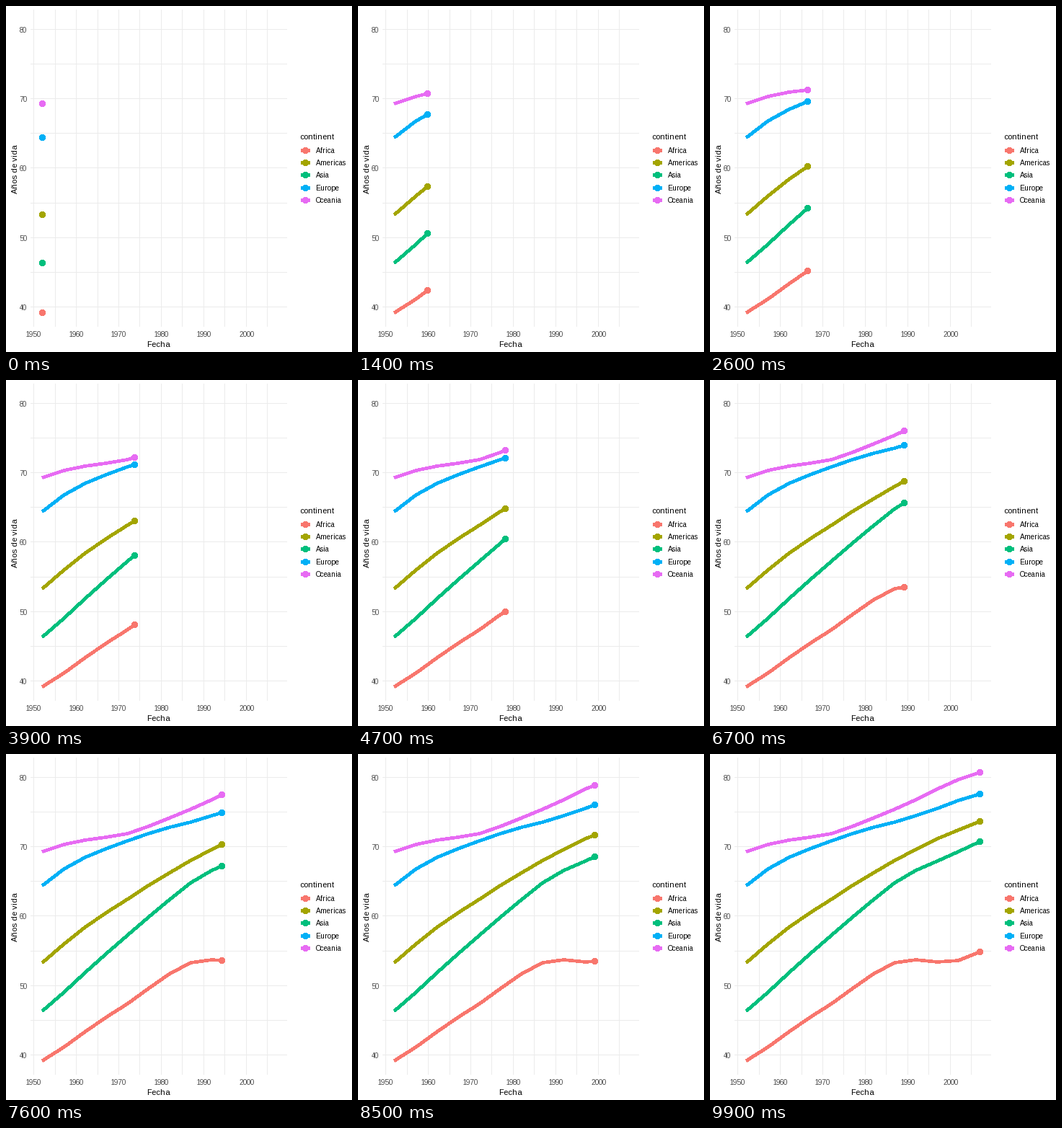
These frames come from a looping animation (480x480 px, 10 s). A matplotlib script:

```python
import numpy as np
import matplotlib.pyplot as plt
from matplotlib.animation import FuncAnimation
from matplotlib.patches import Circle, Rectangle

plt.rcParams["font.family"] = "Liberation Sans"
plt.rcParams["text.hinting_factor"] = 1

SIZE, FRAMES = 480, 100
LEFT, TOP, WIDTH, HEIGHT = 34.4, 5.5, 356, 440.2
GRID, TICK = "#EBEBEB", "#4D4D4D"
FIRST, LAST = 1952, 2007
YEARS = np.arange(FIRST, LAST + 1, 5)

# name: colour, first value, last value, sine waves bending the straight line
SERIES = {
    "Africa": ("#F8766D", 39.14, 54.81, (3.45, -0.44, -0.43, 0.49, -0.24)),
    "Americas": ("#A3A500", 53.28, 73.61, (2.03, 0.04, 0.19, 0.08, 0.05)),
    "Asia": ("#00BF7D", 46.31, 70.73, (2.68, -0.45, -0.05, 0.16, -0.08)),
    "Europe": ("#00B0F6", 64.41, 77.65, (1.43, 0.68, 0.19, 0.10, 0.13)),
    "Oceania": ("#E76BF3", 69.25, 80.72, (-1.27, -0.11, 0.32, 0.13, 0.14)),
}
X_MIN, X_SPAN = FIRST - 2.75, 60.5
Y_MAX, Y_SPAN = 82.799, 45.742


def life(start, end, waves):
    u = (YEARS - FIRST) / (LAST - FIRST)
    bend = sum(a * np.sin(k * np.pi * u) for k, a in enumerate(waves, 1))
    return start + (end - start) * u + bend


def px(year):
    return np.floor(LEFT + (np.asarray(year) - X_MIN) / X_SPAN * WIDTH)


def py(value):
    return np.floor(TOP + (Y_MAX - np.asarray(value)) / Y_SPAN * HEIGHT)


fig = plt.figure(figsize=(SIZE / 72, SIZE / 72), dpi=72, facecolor="white")
ax = fig.add_axes([0, 0, 1, 1])
ax.set_xlim(0, SIZE)
ax.set_ylim(SIZE, 0)
ax.axis("off")


def box(x, y, w, h):
    ax.add_patch(Rectangle((x, y), w, h, fc=GRID, ec="none", aa=False, zorder=1))


def label(x, y, text, size=9.5, color="black", ha="left", **kw):
    ax.text(x, y, text, fontsize=size, color=color, ha=ha, va="baseline", **kw)


def stroke(xs, ys, color):
    # Aliased drawing fills every touched pixel, so 3.6 comes out 5 wide
    line, = ax.plot(xs, ys, color=color, lw=3.6, aa=False, zorder=2,
                    solid_capstyle="butt", solid_joinstyle="round")
    line.set_snap(False)
    return line


def dot(x, y, color):
    return ax.add_patch(Circle((x + 0.5, y + 0.5), 3.9, fc=color, ec="none",
                               aa=False, snap=False, zorder=3))


for year in range(1950, 2010, 5):
    box(px(year), 5, 1, 440)
    if year % 10 == 0:
        label(px(year) + 0.5, 459, str(year), color=TICK, ha="center")
for value in range(40, 85, 5):
    box(34, py(value), 356, 1)
    if value % 10 == 0:
        label(29, py(value) + 5, str(value), color=TICK, ha="right")

label(212, 473, "Fecha", 11, ha="center")
label(16, 225.6, "Años de vida", 11, ha="center", rotation=90,
      rotation_mode="anchor")
label(407, 185, "continent", 11)

tracks = []
for i, (name, (color, *shape)) in enumerate(SERIES.items()):
    mid = 200.2 + 17.28 * i
    row = np.floor(mid)
    stroke([409, 422], [row + 0.5] * 2, color)
    dot(415, row, color)
    label(430, np.floor(mid + 4), name)
    tracks.append((life(*shape), stroke([], [], color), dot(0, 0, color)))


def update(k):
    now = FIRST + (LAST - FIRST) * k / (FRAMES - 1)
    past = YEARS < now
    xs = px(np.append(YEARS[past], now)) + 0.5
    for values, line, head in tracks:
        ys = py(np.append(values[past], np.interp(now, YEARS, values))) + 0.5
        line.set_data(xs, ys)
        head.set_center((xs[-1], ys[-1]))
    return [artist for track in tracks for artist in track[1:]]


anim = FuncAnimation(fig, update, frames=FRAMES, init_func=lambda: update(0),
                     interval=100, repeat=True, repeat_delay=0, blit=False)
plt.show()
```
